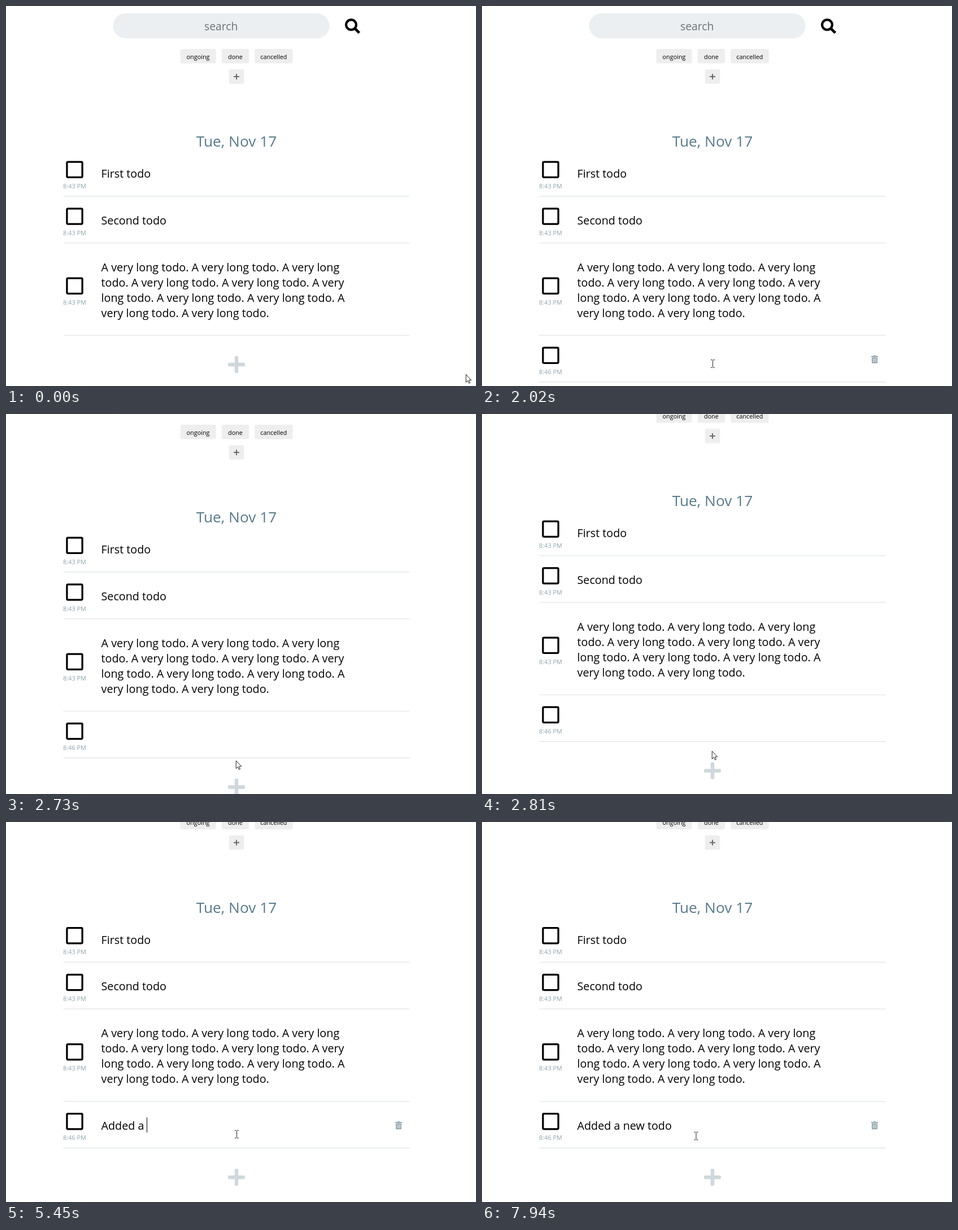
An HTML page with a canvas that plays this animation: 832 px wide and 673 px high, repeating every 8 s.

```html
<!DOCTYPE html>
<html lang="en">
<head>
<meta charset="utf-8">
<title>Todo list</title>
<style>
  html, body { margin: 0; width: 100%; height: 100%; overflow: hidden; background: #fff; }
  canvas { display: block; }
</style>
</head>
<body>
<canvas id="stage" width="832" height="673"></canvas>
<script>
const ctx = document.getElementById('stage').getContext('2d');
const LOOP = 8000;
const FONT = '"Open Sans", "Noto Sans", sans-serif';
const TODO_FONT = 19.76;
const LEFT = 101.5, TEXT_X = 168.5;
const MUTED = '#90a4ae', PALE = '#eceff1';

const NEW_TODO = 'Added a new todo';
const KEY_TIMES = [3960, 4200, 4440, 4900, 5070, 5230, 5300, 5450,
                   5700, 5780, 5870, 5950, 6100, 6270, 6340, 6510];
const CARET = [[0, false], [3110, true], [3650, false], [3960, true], [4750, false],
               [4900, true], [6850, false], [7390, true], [7940, false]];
const SCROLL = [[0, 0], [2570, 1.5], [2650, 17.7], [2730, 57], [2810, 86], [2890, 88.5]];
const TRASH = [[0, null], [770, 'long'], [1080, null], [1940, 'new'], [2730, null], [2960, 'new']];
const POINTER = [
  [0, 'arrow', 814, 652.5], [70, 'arrow', 810, 600], [150, 'arrow', 802, 545],
  [690, 'arrow', 790, 548], [770, 'arrow', 755, 556], [850, 'arrow', 690, 568],
  [930, 'arrow', 610, 576], [1010, 'arrow', 535, 586], [1080, 'arrow', 468, 594],
  [1150, 'arrow', 437, 601], [1230, 'hand', 416, 622], [1310, 'hand', 409, 637],
  [1400, 'hand', 408, 632], [1480, 'hand', 407, 627], [1710, 'hand', 401, 627],
  [1940, 'beam', 405, 630], [2020, 'beam', 408.5, 633.5], [2730, 'arrow', 407, 614],
  [2810, 'arrow', 407, 597], [2890, 'arrow', 407, 584], [2960, 'beam', 408, 570],
  [3040, 'beam', 408, 558], [3110, 'beam', 402, 551], [3270, 'beam', 408.5, 553],
  [7700, 'beam', 408, 557], [7780, 'beam', 403, 564.5], [7860, 'beam', 392, 562],
  [7940, 'beam', 379, 556]
];

// Latest entry whose start time has passed.
const at = (track, t) => track.findLast(entry => entry[0] <= t);

function text(str, x, y, size, color, align = 'left') {
  ctx.font = `${size}px ${FONT}`;
  ctx.textAlign = align;
  ctx.fillStyle = color;
  ctx.fillText(str, x, y);
}

function box(x, y, w, h, r, color) {
  ctx.beginPath();
  ctx.roundRect(x, y, w, h, r);
  ctx.fillStyle = color;
  ctx.fill();
}

function plus(x, y, size, thick, r, color) {
  box(x - size / 2, y - thick / 2, size, thick, r, color);
  box(x - thick / 2, y - size / 2, thick, size, r, color);
}

function line(x1, y1, x2, y2, width, color) {
  ctx.beginPath();
  ctx.moveTo(x1, y1);
  ctx.lineTo(x2, y2);
  ctx.lineWidth = width;
  ctx.strokeStyle = color;
  ctx.stroke();
}

function header() {
  box(189.5, 13, 383, 44.3, 22.15, PALE);
  text('search', 380.7, 43, 19.4, '#6f7275', 'center');

  ctx.beginPath();
  ctx.arc(611, 33.2, 8.9, 0, Math.PI * 2);
  ctx.lineWidth = 4.2;
  ctx.strokeStyle = '#000';
  ctx.stroke();
  line(617.4, 39.6, 625.4, 47.6, 4.8, '#000');

  for (const [label, x, w] of [['ongoing', 308.5, 63], ['done', 382, 48], ['cancelled', 440.3, 67.2]]) {
    box(x, 76, w, 25.4, 3, '#eee');
    text(label, x + w / 2, 93.8, 10.8, '#000', 'center');
  }
  box(394.7, 112.2, 26.5, 25.6, 3, '#eee');
  plus(408, 125, 10, 2, 0.5, '#6a6a6a');
  text('Tue, Nov 17', 408, 249.3, 26.3, '#567a8a', 'center');
}

function trash(y) {
  box(693, y - 7, 4, 2, 0.5, MUTED);
  box(689, y - 6, 12, 2, 0.5, MUTED);
  box(690, y - 3.3, 10, 10.3, 1, MUTED);
  for (const x of [692.2, 694.6, 697]) box(x, y - 1.6, 0.9, 6.8, 0, '#fff');
}

// y is the middle of the checkbox.
function row(y, time, lines, ruleY, hovered) {
  ctx.beginPath();
  ctx.roundRect(107.9, y - 13.6, 27.2, 27.2, 1.8);
  ctx.lineWidth = 3.3;
  ctx.strokeStyle = '#000';
  ctx.stroke();
  text(time, 121.4, y + 33.2, 10.85, MUTED, 'center');
  const firstY = y + 14.3 - (lines.length - 1) * 13.5;
  lines.forEach((str, i) => text(str, TEXT_X, firstY + i * 27, TODO_FONT, '#000'));
  box(LEFT, ruleY - 0.9, 613, 1.8, 0, '#e9ecee');
  if (hovered) trash(y + 7);
}

const LONG_LINES = [
  'A very long todo. A very long todo. A very long',
  'todo. A very long todo. A very long todo. A very',
  'long todo. A very long todo. A very long todo. A',
  'very long todo. A very long todo.'
];

function caret(str) {
  ctx.font = `${TODO_FONT}px ${FONT}`;
  ctx.fillStyle = '#000';
  ctx.fillRect(Math.round(TEXT_X + ctx.measureText(str).width - 0.5), 611.8, 1, 26.5);
}

function outline(points) {
  ctx.beginPath();
  points.forEach(([x, y]) => ctx.lineTo(x, y));
  ctx.closePath();
  ctx.fillStyle = '#fff';
  ctx.fill();
  ctx.lineWidth = 1.1;
  ctx.lineJoin = 'round';
  ctx.strokeStyle = '#111';
  ctx.stroke();
}

const cursors = {
  arrow() {
    ctx.scale(0.85, 0.85);
    outline([[0.3, 0], [0.3, 16.5], [4, 13], [6.4, 18.4], [8.8, 17.4], [6.5, 12], [11.4, 12]]);
  },
  hand() {
    ctx.scale(0.85, 0.85);
    outline([[-1.5, 1], [0, 0], [1.5, 1], [1.5, 6], [5, 6.5], [8.5, 8], [11, 9.5], [11, 15],
             [9, 21], [0, 21], [-5.5, 13], [-5, 11.2], [-3.5, 11.5], [-1.5, 14]]);
  },
  beam() {
    const ink = '#333';
    line(0, -6, 0, 6, 1.1, ink);
    for (const y of [-6.8, 6.8]) {
      line(-3.6, y, -0.6, y, 1.1, ink);
      line(0.6, y, 3.6, y, 1.1, ink);
    }
  }
};

function draw(t) {
  ctx.fillStyle = '#fff';
  ctx.fillRect(0, 0, 832, 673);

  const added = t >= 1860;
  const hovered = at(TRASH, t)[1];
  const typed = NEW_TODO.slice(0, KEY_TIMES.filter(k => k <= t).length);

  ctx.save();
  ctx.translate(0, -at(SCROLL, t)[1]);
  header();
  row(289.7, '8:43 PM', ['First todo'], 336.9, false);
  row(372.5, '8:43 PM', ['Second todo'], 419.7, false);
  row(495.7, '8:43 PM', LONG_LINES, 583.3, hovered === 'long');
  if (added) {
    row(618.7, '8:46 PM', [typed], 666, hovered === 'new');
    if (at(CARET, t)[1]) caret(typed);
  }
  plus(408, added ? 717.7 : 635, 30, 6.4, 2, '#cfd8dc');
  ctx.restore();

  const [, shape, x, y] = at(POINTER, t);
  ctx.save();
  ctx.translate(x, y);
  cursors[shape]();
  ctx.restore();
}

function tick() {
  draw(performance.now() % LOOP);
  requestAnimationFrame(tick);
}
tick();
</script>
</body>
</html>
```
